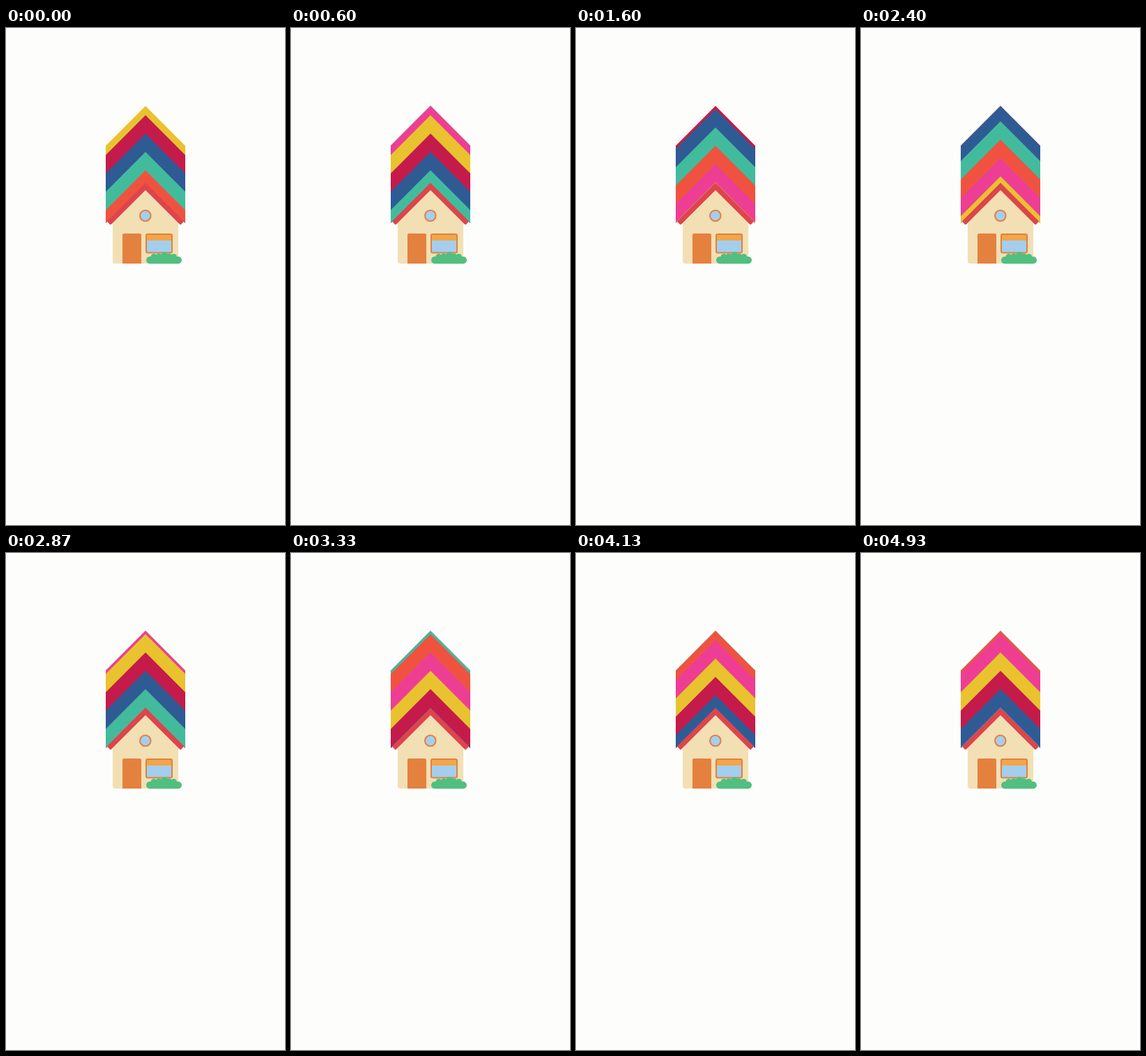
An HTML page for the animation above (4.99 s loop, 400 px wide and 711 px high).

```html
<!DOCTYPE html>
<html lang="en">
<head>
<meta charset="utf-8">
<title>House with a climbing roof</title>
<style>
  html, body { margin: 0; width: 100%; height: 100%; overflow: hidden; background: #fdfdfc; }
  svg { display: block; width: 100%; height: 100%; }
</style>
</head>
<body>
<svg viewBox="0 0 400 711">
  <defs>
    <clipPath id="tower">
      <path d="M200 111.5 L257 168.5 V279 L200 222 L143 279 V168.5 Z"/>
    </clipPath>
  </defs>

  <g clip-path="url(#tower)"><g id="stripes"></g></g>

  <!-- wall -->
  <path d="M200 229 L247 276 V333 Q247 337 243 337 H157 Q153 337 153 333 V276 Z" fill="#f3dfb4"/>

  <!-- eaves -->
  <path d="M200 221.5 L254.3 275.8 Q255.2 276.7 254.3 277.6 L251 280.9 Q250.1 281.7 249.2 280.9
           L200 232 L150.8 280.9 Q149.9 281.7 149 280.9 L145.7 277.6 Q144.8 276.7 145.7 275.8 Z" fill="#de444c"/>

  <!-- round window -->
  <circle cx="199.8" cy="268.5" r="7.8" fill="#a4ceee" stroke="#e08140" stroke-width="2"/>

  <!-- door -->
  <path d="M167 337 V296 Q167 294 169 294 H192 Q194 294 194 296 V337 Z" fill="#e5813e"/>

  <!-- window -->
  <rect x="201" y="295" width="37" height="26.5" rx="2" fill="#a4ceee"/>
  <rect x="201" y="295" width="37" height="9" fill="#f3a649"/>
  <rect x="201" y="295" width="37" height="26.5" rx="2" fill="none" stroke="#e08140" stroke-width="2"/>

  <!-- bush -->
  <g fill="#50bf80">
    <rect x="201" y="327" width="51" height="10.2" rx="5.1"/>
    <circle cx="212" cy="327.5" r="4.5"/>
    <circle cx="219" cy="326.5" r="4"/>
    <circle cx="227" cy="325.5" r="5"/>
    <circle cx="233.5" cy="326.5" r="4"/>
    <circle cx="240.5" cy="327.5" r="4.5"/>
  </g>
</svg>

<script>
const LOOP = 4990;
const FRAME = 1000 / 15;
const COLORS = ['#e9c22f', '#c41b4b', '#2f5b95', '#42bb9c', '#ef5340', '#ee3e94'];
const GAP = 26.25;
const TOP = 98.5;
const STEP = GAP / 3;
const CYCLE = COLORS.length * 3;

// Each chevron covers the lower part of the one above it.
const stripes = document.getElementById('stripes');
for (let i = 0; i < 15; i++) {
  const chevron = document.createElementNS('http://www.w3.org/2000/svg', 'path');
  chevron.setAttribute('d', `M200 ${TOP + i * GAP} l70 70 v500 h-140 v-500 z`);
  chevron.setAttribute('fill', COLORS[i % COLORS.length]);
  stripes.append(chevron);
}

// The climb runs at 25 steps a second and restarts every 55 steps,
// shown at 15 pictures a second.
function shift(ms) {
  const picture = Math.floor((ms + 5) / FRAME);
  const step = Math.floor(picture * 5 / 3) % 55;
  return -(step % CYCLE) * STEP;
}

const start = performance.now();
function draw() {
  const ms = (performance.now() - start) % LOOP;
  stripes.setAttribute('transform', `translate(0 ${shift(ms)})`);
  requestAnimationFrame(draw);
}
draw();
</script>
</body>
</html>
```
